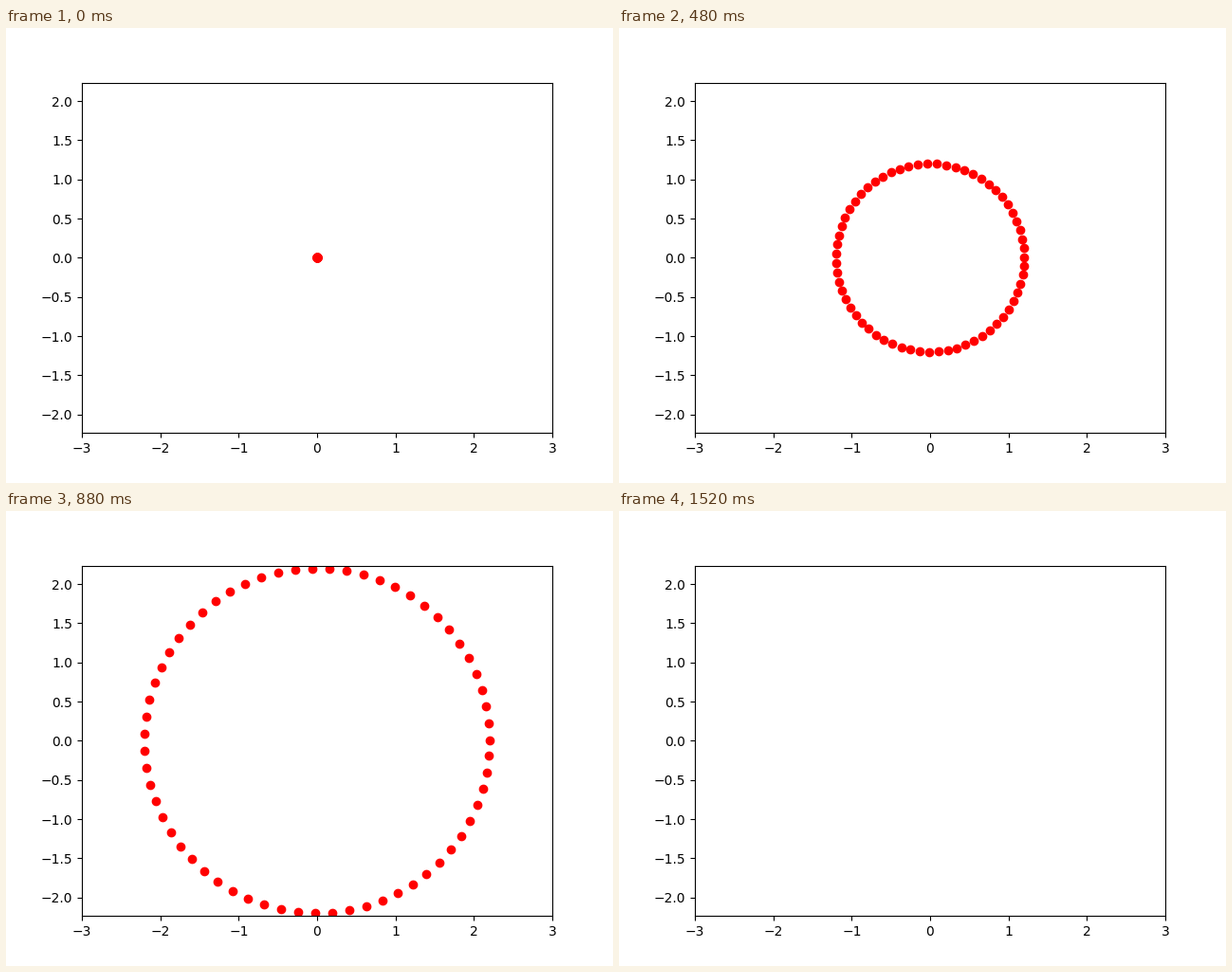
Animation, 640 px wide and 480 px high, one loop 4530 ms. Source, as a matplotlib script:

```python
import numpy as np
import matplotlib.pyplot as plt
from matplotlib.animation import FuncAnimation

LOOP_MS = 4530
INTERVAL_MS = 10
STEP_MS = 20
LAST_STEP = 76          # the ring has left the axes; hold until the loop ends
GROWTH = 0.05           # radius gained per step
X_LIMIT = 3

angles = np.arange(0, 2 * np.pi, 0.1)
directions = np.cos(angles), np.sin(angles)

fig, ax = plt.subplots(figsize=(6.4, 4.8), dpi=100)
box = ax.get_position()
y_limit = X_LIMIT * (box.height * 4.8) / (box.width * 6.4)  # equal scale on both axes
ax.set_xlim(-X_LIMIT, X_LIMIT)
ax.set_ylim(-y_limit, y_limit)
ring, = ax.plot([], [], "ro")


def update(frame):
    step = min(frame * INTERVAL_MS // STEP_MS, LAST_STEP)
    radius = GROWTH * step
    ring.set_data(radius * directions[0], radius * directions[1])
    ring.set_visible(step < LAST_STEP)
    return ring,


anim = FuncAnimation(fig, update, frames=LOOP_MS // INTERVAL_MS,
                     interval=INTERVAL_MS, repeat=True, repeat_delay=0)
plt.show()
```
